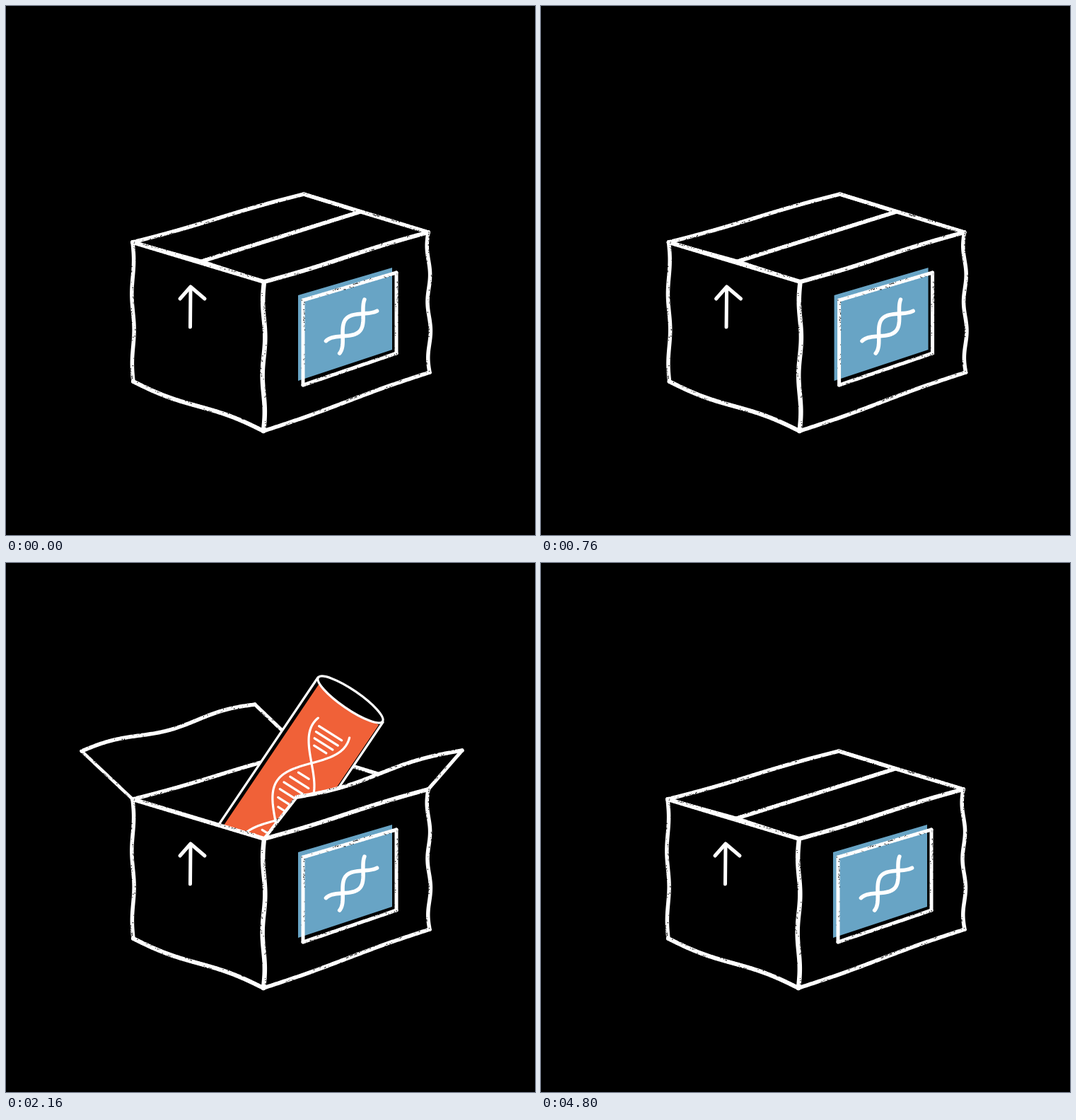
Recreate the animation shown at these times as an HTML page with a canvas. Size 748x748 px, loop 5.24 s.

```html
<!DOCTYPE html>
<html lang="en">
<head>
<meta charset="utf-8">
<title>Parcel</title>
<style>
html, body { margin: 0; width: 100%; height: 100%; overflow: hidden; background: #000; }
canvas { display: block; width: 100vmin; height: 100vmin; }
</style>
</head>
<body>
<canvas id="stage" width="748" height="748"></canvas>
<script>
const ctx = document.getElementById('stage').getContext('2d');
const LOOP = 5240, STEP = 40, HIDDEN = 240;
const ORANGE = '#f06138', BLUE = '#68a4c5';
const { PI, sin, cos, hypot, abs } = Math;
ctx.lineCap = ctx.lineJoin = 'round';

// Box corners
const LEFT = [179, 334], FRONT = [365, 390], RIGHT = [597, 320], BACK = [421, 266];
const LEFT_FOOT = [180, 531], FRONT_FOOT = [364, 601], RIGHT_FOOT = [599, 518];
const SEAM = [[277, 361], [501, 291]];

const clamp = u => Math.min(1, Math.max(0, u));
const ease = (t, from, to) => (1 - cos(PI * clamp((t - from) / (to - from)))) / 2;

// Damped sideways wobble
function shake(t) {
  const u = clamp((t - 280) / 560);
  return -31 * (1 - u) ** 1.3 * sin(11.8 * u);
}

const lidOpening = t => ease(t, 840, 1160) - ease(t, 4480, 4800);

// Rises past its resting place, settles, later hops and drops back
const tubeDrop = t => HIDDEN - (HIDDEN + 25) * ease(t, 940, 1370) + 25 * ease(t, 1370, 1640)
  - 50 * ease(t, 4320, 4480) + (HIDDEN + 50) * ease(t, 4480, 4680);

function randomizer(seed) {
  return () => (seed = seed * 16807 % 2147483647) / 2147483647;
}

function trace(pts) {
  ctx.beginPath();
  pts.forEach(p => ctx.lineTo(...p));
}

function fill(pts, color) {
  trace(pts);
  ctx.fillStyle = color;
  ctx.fill();
}

function line(pts, width) {
  trace(pts);
  ctx.strokeStyle = '#fff';
  ctx.lineWidth = width;
  ctx.stroke();
}

// Points from a to b, bent sideways by a sine with the given number of waves
function wavy(a, b, amp = 0, waves = 1) {
  const dx = b[0] - a[0], dy = b[1] - a[1], len = hypot(dx, dy);
  const count = Math.ceil(len / 1.5);
  return Array.from({ length: count + 1 }, (_, i) => {
    const u = i / count, off = amp * sin(2 * PI * waves * u) / len;
    return [a[0] + dx * u - dy * off, a[1] + dy * u + dx * off];
  });
}

// White line with worn, speckled edges
function chalk(a, b, width, amp, waves) {
  const path = wavy(a, b, amp, waves);
  line(path, width);
  const random = randomizer(Math.round(width * 1000 + path.length * 77));
  const dx = b[0] - a[0], dy = b[1] - a[1], len = hypot(dx, dy);
  let side = 1, wear = 0;
  ctx.fillStyle = '#000';
  path.forEach(([x, y], i) => {
    if (i % 10 === 0) {
      side = random() < 0.5 ? -1 : 1;
      wear = random() * 0.65;
    }
    const off = side * width * (0.15 + 0.35 * random()) / len;
    const size = 0.5 + 0.9 * random();
    if (random() < wear) ctx.fillRect(x - dy * off - size / 2, y + dx * off - size / 2, size, size);
  });
}

// Double helix around an axis through one crossing; returns a point finder
function helix(crossing, angle, halfWave, amp, from, to, width) {
  const at = (s, off) => [
    crossing[0] + s * cos(angle) + off * sin(angle),
    crossing[1] + s * sin(angle) - off * cos(angle)
  ];
  const spread = s => amp * sin(PI * s / halfWave);
  for (const side of [-1, 1]) {
    const strand = [];
    for (let s = from; s <= to; s += 2) strand.push(at(s, side * spread(s)));
    line(strand, width);
  }
  return { at, spread };
}

// Flap on a hinge; each tip swings on an arc from its shut to its open place
function flap(hinge, open, swing, k, amp, waves) {
  const tips = hinge.map((h, i) => h.map((v, c) => v
    + ((SEAM[i][c] - v) * sin((1 - k) * swing) + (open[i][c] - v) * sin(k * swing)) / sin(swing)));
  fill([hinge[0], ...wavy(...tips, amp * k, waves), hinge[1]], '#000');
  chalk(hinge[0], tips[0], 4.5);
  chalk(...tips, 5.5, amp * k, waves);
  chalk(tips[1], hinge[1], 5);
}

function drawTube(drop) {
  ctx.save();
  trace([[0, 0], [748, 0], [748, 320], RIGHT, FRONT, LEFT, [0, 334]]);
  ctx.clip();
  ctx.translate(0, drop);
  const down = ([x, y]) => [x - 186, y + 276];
  const wall = (a, b, color) => fill([a, b, down(b), down(a)], color);
  const a = [441, 162], b = [533, 225];
  wall(a, b, '#000');
  wall([446, 166], [527, 229], ORANGE);
  line([a, down(a)], 3.2);
  line([b, down(b)], 3.2);
  ctx.beginPath();
  ctx.ellipse(487, 193, 55, 13.5, 0.6, 0, 2 * PI);
  ctx.fillStyle = '#000';
  ctx.fill();
  ctx.stroke();

  const { at, spread } = helix([432, 283], 2.133, 96, 28, -59, 150, 3.2);
  const rungs = (first, gap, count) => {
    for (let i = 0; i < count; i++) {
      const s = first + gap * i, half = abs(spread(s)) - 9;
      line([at(s, -half), at(s, half)], 3.2);
    }
  };
  rungs(-50, 9, 4);
  rungs(21, 11.3, 6);
  rungs(117, 11.3, 3);
  ctx.restore();
}

function drawBody() {
  chalk(LEFT, FRONT, 6);
  chalk(FRONT, RIGHT, 6, 1);
  chalk(LEFT, LEFT_FOOT, 5.5, -1.5, 2);
  chalk(FRONT, FRONT_FOOT, 6.5, 1.7, 2);
  chalk(RIGHT, RIGHT_FOOT, 5.5, 2, 2.5);
  chalk(LEFT_FOOT, FRONT_FOOT, 6, 3);
  chalk(FRONT_FOOT, RIGHT_FOOT, 5.5, 1);

  line([[261, 398], [260.5, 454]], 5);
  line([[246, 414], [261, 397], [281, 414]], 5);

  fill([[413, 409], [546, 370], [546, 486], [413, 530]], BLUE);
  const corners = [[420, 416], [552, 377], [552, 491], [420, 536]];
  corners.forEach((p, i) => chalk(p, corners[(i + 1) % 4], 5));
  helix([505, 435], 2.307, 43, 13, -16, 64, 5.5);
}

function draw(t) {
  const lid = lidOpening(t), drop = tubeDrop(t);
  ctx.fillStyle = '#000';
  ctx.fillRect(0, 0, 748, 748);
  ctx.save();
  ctx.translate(shake(t), 0);
  flap([LEFT, BACK], [[107, 266], [352, 200]], 2.35, lid, -3.5, 1.5);
  chalk(LEFT, BACK, 5.5, 1);
  chalk(BACK, RIGHT, 5.5);
  if (drop < HIDDEN) drawTube(drop);
  flap([FRONT, RIGHT], [[411, 331], [645, 265]], 2.1, lid, 4, 1);
  drawBody();
  ctx.restore();
}

function frame() {
  const t = performance.now() % LOOP;
  draw(t - t % STEP);
  requestAnimationFrame(frame);
}
frame();
</script>
</body>
</html>
```
